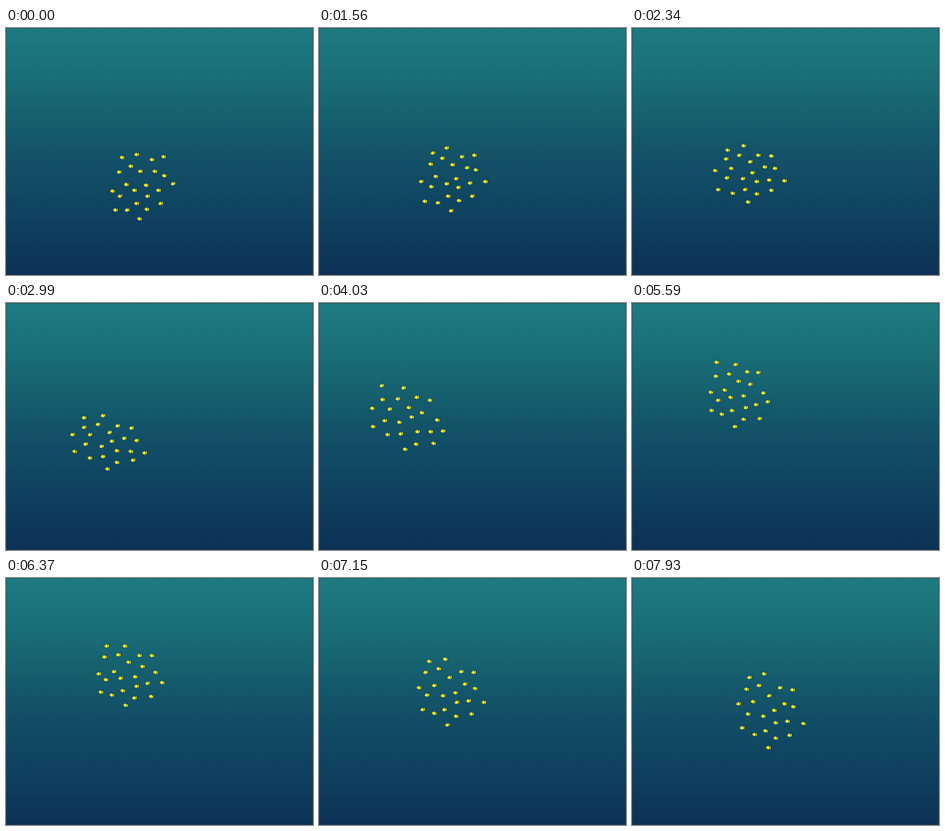
These frames come from a looping animation (421 by 338 pixels, 8060 ms). An HTML page:

```html
<!DOCTYPE html>
<html lang="en">
<head>
<meta charset="utf-8">
<title>School of fish</title>
<style>
  html, body { margin: 0; width: 100%; height: 100%; overflow: hidden; background: #0c3256; }
  svg { display: block; width: 100%; height: 100%; }
</style>
</head>
<body>
<svg viewBox="0 0 421 338" preserveAspectRatio="none">
  <defs>
    <linearGradient id="water" x1="0" y1="0" x2="0" y2="1">
      <stop offset="0" stop-color="#1e7b81"/>
      <stop offset=".22" stop-color="#196d77"/>
      <stop offset=".5" stop-color="#135368"/>
      <stop offset=".75" stop-color="#0f4260"/>
      <stop offset="1" stop-color="#0c3156"/>
    </linearGradient>
    <g id="fish">
      <path d="M-3.2 .2 Q-1.8 -2.5 .3 -2.2 L1.5 -.7 L3 -2.4 V2.4 L1.6 1 L.8 2.6 L-.8 2.1 Q-2.5 1.8 -3.2 .2Z"
            fill="#fbf826" stroke="#10303c" stroke-opacity=".6" stroke-width="1.2" paint-order="stroke"/>
      <path d="M1.5 -.8 V1.2" stroke="#4a521c" stroke-width=".6"/>
      <circle cx="-1.6" cy="-.4" r=".4" fill="#3a4018"/>
    </g>
  </defs>
  <rect width="421" height="338" fill="url(#water)"/>
  <rect x=".5" y=".5" width="420" height="337" fill="none" stroke="#363c40" stroke-opacity=".45"/>
  <g id="school"></g>
</svg>
<script>
const LOOP = 8060, HOLD = 650, STEP = 130;
const COUNT = 23, GOLDEN = Math.PI * (3 - Math.sqrt(5));

// Key points of the path: step, centre x, y, radius x, y, lean.
const path = [
  [0, 185, 214, 45, 53, -.13],
  [8, 182, 205, 46, 50, -.05],
  [19, 139, 189, 53, 39, .18],
  [27, 120, 156, 54, 47, .26],
  [39, 145, 124, 45, 51, .15],
  [45, 168, 132, 49, 48, .12],
  [57, 188, 180, 47, 56, .22]
];

function noise(a, b) {
  const v = Math.sin(a * 12.9898 + b * 78.233) * 43758.5453;
  return v - Math.floor(v);
}

function slope(i, c) {
  const p = path[Math.max(i - 1, 0)], q = path[Math.min(i + 1, path.length - 1)];
  return (q[c] - p[c]) / (q[0] - p[0]);
}

// Smooth curve through column c of the path.
function curve(i, c, u) {
  const p = path[i], q = path[i + 1], d = q[0] - p[0], s = u * u * (3 - 2 * u);
  return p[c] + (q[c] - p[c]) * s
    + d * u * (1 - u) * ((1 - u) * slope(i, c) - u * slope(i + 1, c));
}

// Evenly spread fish on a unit disc, each with its own slow drift.
const school = document.getElementById("school");
const fish = Array.from({ length: COUNT }, (_, n) => {
  const r = Math.sqrt((n + .5) / COUNT), a = n * GOLDEN;
  const el = document.createElementNS("http://www.w3.org/2000/svg", "use");
  el.setAttribute("href", "#fish");
  school.append(el);
  return { el, x: r * Math.cos(a), y: r * Math.sin(a), phase: 2 * Math.PI * noise(n, 1) };
});

function draw(step) {
  let i = 0;
  while (i < path.length - 2 && step >= path[i + 1][0]) i++;
  const u = (step - path[i][0]) / (path[i + 1][0] - path[i][0]);
  const [cx, cy, rx, ry, lean] = [1, 2, 3, 4, 5].map(c => curve(i, c, u));

  fish.forEach(({ el, x, y, phase }, n) => {
    const dx = rx * x + 2 * Math.cos(phase + step * .12);
    const dy = ry * y + lean * dx + 2 * Math.sin(phase + step * .15);
    const tilt = 30 * noise(n + 1, step + 1) - 15;
    el.setAttribute("transform",
      `translate(${Math.round(cx + dx)} ${Math.round(cy + dy)}) rotate(${tilt.toFixed(1)})`);
  });
}

const start = performance.now();
let shown = -1;
function tick() {
  const t = (performance.now() - start) % LOOP;
  const step = t < HOLD ? 0 : Math.floor((t - HOLD) / STEP) + 1;
  if (step !== shown) draw(shown = step);
  requestAnimationFrame(tick);
}
tick();
</script>
</body>
</html>
```
